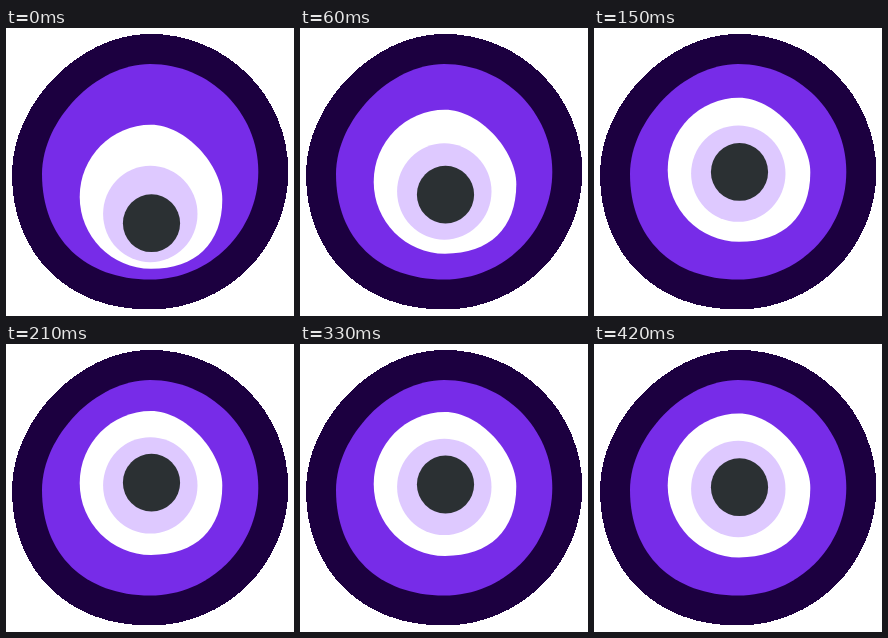
These frames come from a looping animation (288 by 288 pixels, 0.45 s). An HTML page:

```html
<!DOCTYPE html>
<html lang="en">
<head>
<meta charset="utf-8">
<title>Eye</title>
<style>
  html, body { margin: 0; width: 100%; height: 100%; overflow: hidden; background: #fff; }
  svg { display: block; width: 100vw; height: 100vh; }
  #rim { fill: #1c0040; stroke: #1c0040; stroke-width: 60; shape-rendering: crispEdges; }
  #soft { filter: blur(.5px); }
</style>
</head>
<body>
<svg viewBox="0 0 288 288">
  <defs>
    <path id="lid" d="M144.1 35.9C203.7 35.9 252.3 84.2 252.3 143.7C252.3 203.2 203.7 251.5 144.1 251.5C79.1 251.5 36 211 36 146C36 92 90.1 35.9 144.1 35.9Z"/>
  </defs>
  <use id="rim" href="#lid"/>
  <g id="soft">
    <use href="#lid" fill="#772ce8"/>
    <path id="ball" fill="#fff" d="M145 69.4C179 69.4 216.3 109.5 216.3 144C216.3 188 189.5 213.4 145 213.4C105.6 213.4 73.7 181.2 73.7 141.4C73.7 101.6 105.6 69.4 145 69.4Z"/>
    <ellipse id="iris" cx="144.3" cy="145" rx="47.2" ry="48.2" fill="#dec9ff"/>
    <ellipse id="pupil" cx="145.5" cy="143.2" rx="28.6" ry="28.9" fill="#2b3033"/>
  </g>
</svg>
<script>
  const LOOP = 450, STEP = 30, RISE = 420, BACK = 1.70158;
  const parts = [['ball', 27.4], ['iris', 41], ['pupil', 52]]
    .map(([id, travel]) => ({ el: document.getElementById(id), travel }));

  // Remaining distance of a back-out ease: 1 at the start, 0 at the end.
  function remaining(t) {
    const u = 1 - Math.min(t, 1);
    return (BACK + 1) * u ** 3 - BACK * u ** 2;
  }

  const start = performance.now();

  function draw(now) {
    const ms = Math.max(0, now - start) % LOOP;
    const held = Math.floor(ms / STEP + 1e-6) * STEP;
    const k = remaining(held / RISE);
    for (const { el, travel } of parts) {
      el.setAttribute('transform', `translate(0 ${(travel * k).toFixed(3)})`);
    }
    requestAnimationFrame(draw);
  }
  draw(start);
</script>
</body>
</html>
```
